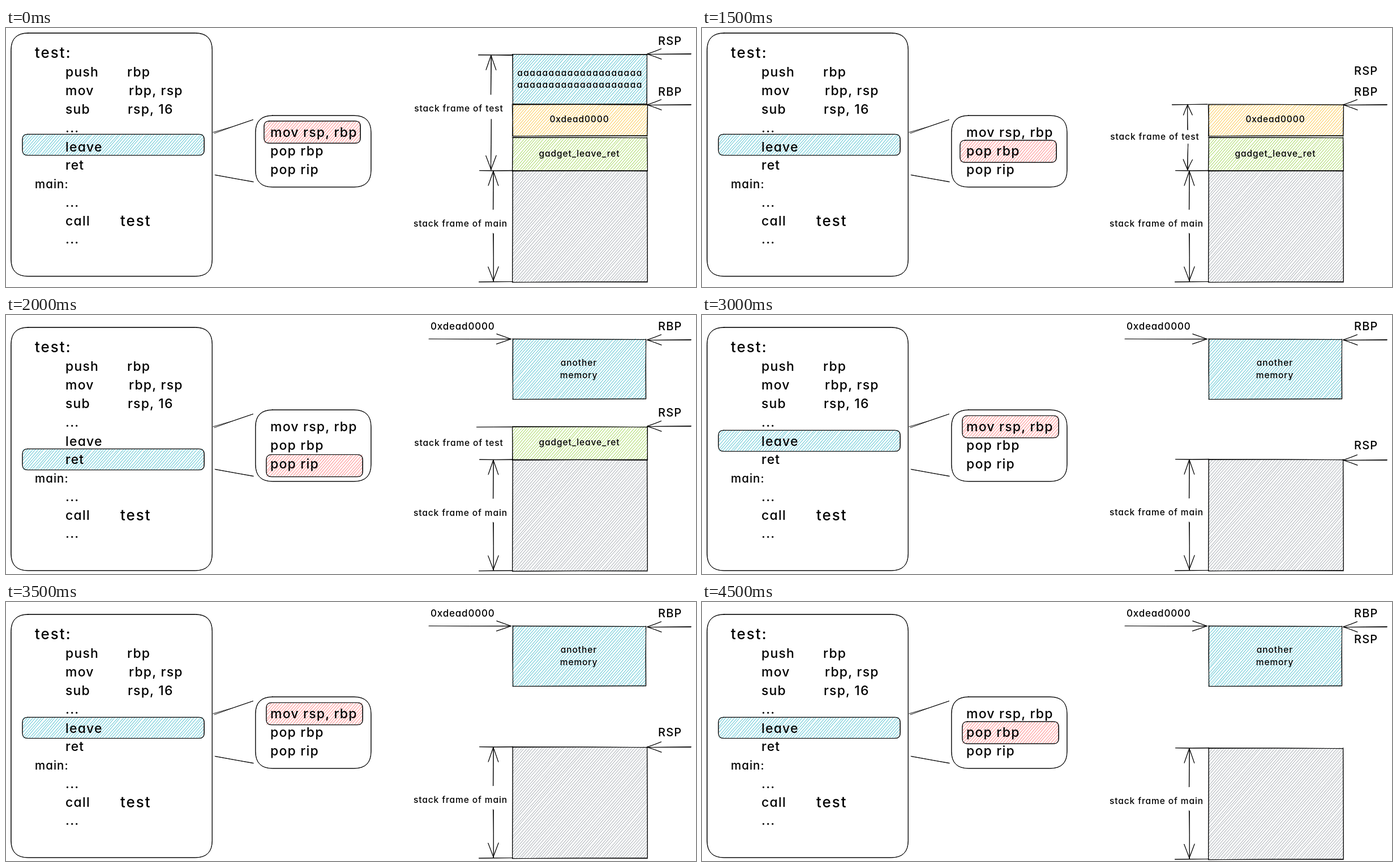
Recreate the animation shown at these times as an HTML page. Size 1219 by 459 pixels, loop 6.5 s.

```html
<!DOCTYPE html>
<html lang="en">
<head>
<meta charset="utf-8">
<title>Stack pivot with leave / ret</title>
<style>
  html, body { margin: 0; width: 100%; height: 100%; overflow: hidden; background: #fff; }
  svg { display: block; width: 1219px; height: 459px; }
  path { fill: none; stroke-linecap: round; stroke-linejoin: round; }
  .ink { stroke: #000; stroke-width: .94; }
  .hatch { stroke-width: .5; }
  text { font-family: Inter, "Open Sans", sans-serif; font-weight: 500; font-feature-settings: "cv11"; fill: #000; white-space: pre; }
  .code { font-size: 23px; letter-spacing: 1.2px; }
  .name { font-size: 26px; letter-spacing: 2px; }
  .label { font-size: 20.5px; letter-spacing: 1px; }
  .reg { font-size: 20px; letter-spacing: 1.2px; }
  .note { font-size: 15.5px; letter-spacing: .9px; }
  .fill { font-size: 15.5px; letter-spacing: 1.5px; }
  .addr { font-size: 17px; letter-spacing: .8px; }
</style>
</head>
<body>
<svg id="stage" viewBox="0 0 1219 459" xmlns="http://www.w3.org/2000/svg"></svg>
<script>
const LOOP = 6500;
const BLUE = '#15aabf', RED = '#fa5252', YELLOW = '#fab005', GREEN = '#82c91e', GREY = '#868e96';

// Seeded jitter, so a shape keeps its hand-drawn wobble from scene to scene.
let seed = 1;
const rand = () => (seed = seed * 16807 % 2147483647) / 2147483647;
const jit = a => (rand() * 2 - 1) * a;
const reseed = (a, b) => { seed = 1 + Math.abs(Math.round(a * 131 + b * 977)); };
const num = v => v.toFixed(1);

const path = (d, cls, color) => `<path class="${cls}" d="${d}"${color ? ` stroke="${color}"` : ''}/>`;
const text = (x, y, s, cls, anchor = 'start') =>
  `<text x="${x}" y="${y}" class="${cls}" text-anchor="${anchor}">${s}</text>`;

function seg(x1, y1, x2, y2, a) {
  const mx = (x1 + x2) / 2 + jit(a), my = (y1 + y2) / 2 + jit(a);
  return `M${num(x1 + jit(a))} ${num(y1 + jit(a))}Q${num(mx)} ${num(my)} ${num(x2 + jit(a))} ${num(y2 + jit(a))}`;
}

function line(x1, y1, x2, y2, a = .8) {
  reseed(x2 - x1, y2 - y1);
  return path(seg(x1, y1, x2, y2, a) + seg(x1, y1, x2, y2, a), 'ink');
}

function hatch(x, y, w, h, color) {
  reseed(w, h);
  const angle = 49 * Math.PI / 180, s = Math.sin(angle), c = Math.cos(angle);
  let d = '';
  for (let k = 2; k < w * s + h * c; k += 3.77) {
    const y1 = Math.min(h, k / c), x1 = (k - y1 * c) / s;
    const x2 = Math.min(w, k / s), y2 = (k - x2 * s) / c;
    for (let pass = 0; pass < 2; pass++) d += seg(x + x1, y + y1, x + x2, y + y2, .9);
  }
  return path(d, 'hatch', color);
}

function block(x1, y1, x2, y2, color) {
  return hatch(x1, y1, x2 - x1, y2 - y1, color) +
    line(x1, y1, x2, y1) + line(x2, y1, x2, y2) + line(x2, y2, x1, y2) + line(x1, y2, x1, y1);
}

function rounded(x1, y1, x2, y2, r) {
  reseed(x2 - x1, y2 - y1);
  let d = '';
  for (let pass = 0; pass < 2; pass++) {
    const l = x1 + jit(.5), t = y1 + jit(.5), e = x2 + jit(.5), b = y2 + jit(.5);
    d += `M${l + r} ${t}L${e - r} ${t}Q${e} ${t} ${e} ${t + r}L${e} ${b - r}Q${e} ${b} ${e - r} ${b}` +
      `L${l + r} ${b}Q${l} ${b} ${l} ${b - r}L${l} ${t + r}Q${l} ${t} ${l + r} ${t}Z`;
  }
  return path(d, 'ink');
}

const pill = (x1, y1, x2, y2, color) =>
  hatch(x1 + 1, y1 + 1, x2 - x1 - 2, y2 - y1 - 2, color) + rounded(x1, y1, x2, y2, 9);

function arrow(x1, y1, x2, y2, len = 25, half = 9) {
  const size = Math.hypot(x2 - x1, y2 - y1), ux = (x2 - x1) / size, uy = (y2 - y1) / size;
  const bx = x2 - ux * len, by = y2 - uy * len;
  return line(x1, y1, x2, y2) +
    line(bx - uy * half, by + ux * half, x2, y2, .6) +
    line(bx + uy * half, by - ux * half, x2, y2, .6);
}

const pointer = (name, textY, y) =>
  text(1152, textY, name, 'reg') + (y ? arrow(1210, y, 1133, y) : '');

function listing(dy, pillY) {
  const rows = [
    [86, 'push', 'rbp', 214], [119, 'mov', 'rbp, rsp', 217], [152, 'sub', 'rsp, 16', 215],
    [185, '...'], [218.5, 'leave'], [251, 'ret'], [317, '...'], [350, 'call'], [382, '...']
  ];
  let s = rounded(9, 9 + dy, 364, 440 + dy, 30) + pill(29, pillY, 350, pillY + 38, BLUE);
  s += text(51, 53 + dy, 'test:', 'name') + text(51, 284 + dy, 'main:', 'label');
  for (const [y, op, args, x] of rows) {
    s += text(105, y + dy, op, 'code');
    if (args) s += text(x, y + dy, args, 'code');
  }
  return s + text(202, 351 + dy, 'test', 'name');
}

function expansion(dy, x, pillY) {
  return line(367, 186 + dy, 436, 163 + dy, 1.2) + line(370, 261 + dy, 438, 272 + dy, 1.2) +
    rounded(441, 155 + dy, 645, 282 + dy, 30) + pill(x, pillY, x + 170, pillY + 39, RED) +
    text(467, 193 + dy, 'mov rsp, rbp', 'code') +
    text(467, 226 + dy, 'pop rbp', 'code') +
    text(467, 259 + dy, 'pop rip', 'code');
}

// Lower frame: grey block, end ticks and the split measuring arrow.
const mainFrame = y =>
  block(895, y, 1133, y + 197, GREY) +
  line(836, y, 895, y) + line(835, y + 197, 895, y + 197) +
  arrow(861, y + 69, 861, y + 1) + arrow(861, y + 111, 861, y + 195) +
  text(803, y + 99, 'stack frame of main', 'note', 'middle');

const gadget = (y, bottom, textY) =>
  block(895, y, 1133, bottom, GREEN) + text(1013, textY, 'gadget_leave_ret', 'note', 'middle');

const saved = () =>
  block(895, 135.5, 1133, 191, YELLOW) + text(1013, 167, '0xdead0000', 'note', 'middle');

const testLabel = y => text(800, y, 'stack frame of test', 'note', 'middle');

const otherMemory = () =>
  text(750, 26, '0xdead0000', 'addr') + arrow(747, 42.5, 892, 42.5) +
  block(895, 43, 1130, 149, BLUE) +
  text(1012, 90, 'another', 'note', 'middle') + text(1012, 112, 'memory', 'note', 'middle') +
  pointer('RBP', 27, 44);

const full = () =>
  listing(0, 188) + expansion(0, 456, 165) +
  block(895, 47, 1132, 135, BLUE) +
  text(1014, 85, 'a'.repeat(20), 'fill', 'middle') + text(1014, 106, 'a'.repeat(20), 'fill', 'middle') +
  saved() + gadget(194, 253, 228) + mainFrame(253) +
  line(834, 48, 895, 48) + arrow(857, 118, 857, 49) + arrow(857, 162, 857, 251) +
  testLabel(148) + pointer('RSP', 30, 46) + pointer('RBP', 120, 136);

const dropped = () =>
  listing(0, 188) + expansion(0, 456, 199) +
  saved() + gadget(194, 253, 228) + mainFrame(253) +
  line(830, 135.5, 893, 135.5) + arrow(858, 180, 858, 136, 18, 8) + arrow(858, 206, 858, 251, 18, 8) +
  testLabel(198) + pointer('RSP', 83) + pointer('RBP', 120, 136);

const returning = dy =>
  listing(13, 237) + expansion(13, 460, 247.5) + otherMemory() +
  gadget(198 + dy, 256.5 + dy, 231) + mainFrame(256.5 + dy) +
  line(831, 198.5 + dy, 893, 198.5 + dy) + testLabel(232) + pointer('RSP', 180, 197);

const secondLeave = y =>
  listing(13, 204) + expansion(13, 460, 178.5) + otherMemory() +
  mainFrame(y) + pointer('RSP', 238, 257);

const pivoted = y =>
  listing(13, 204) + expansion(13, 460, 212) + otherMemory() +
  mainFrame(y) + pointer('RSP', 73);

const scenes = [
  [0, full()], [1000, dropped()], [2000, returning(0)], [2500, returning(1)],
  [3000, secondLeave(256)], [3500, secondLeave(257)],
  [4000, pivoted(258)], [4500, pivoted(259)]
];

const stage = document.getElementById('stage');
stage.innerHTML = scenes.map(([, body]) => `<g display="none">${body}</g>`).join('');
let shown = -1;

function draw(ms) {
  const t = ms % LOOP;
  let now = 0;
  scenes.forEach(([at], i) => { if (t >= at) now = i; });
  if (now === shown) return;
  [...stage.children].forEach((g, i) => g.setAttribute('display', i === now ? 'inline' : 'none'));
  shown = now;
}

const start = performance.now();
function tick() {
  draw(performance.now() - start);
  requestAnimationFrame(tick);
}
tick();
</script>
</body>
</html>
```
